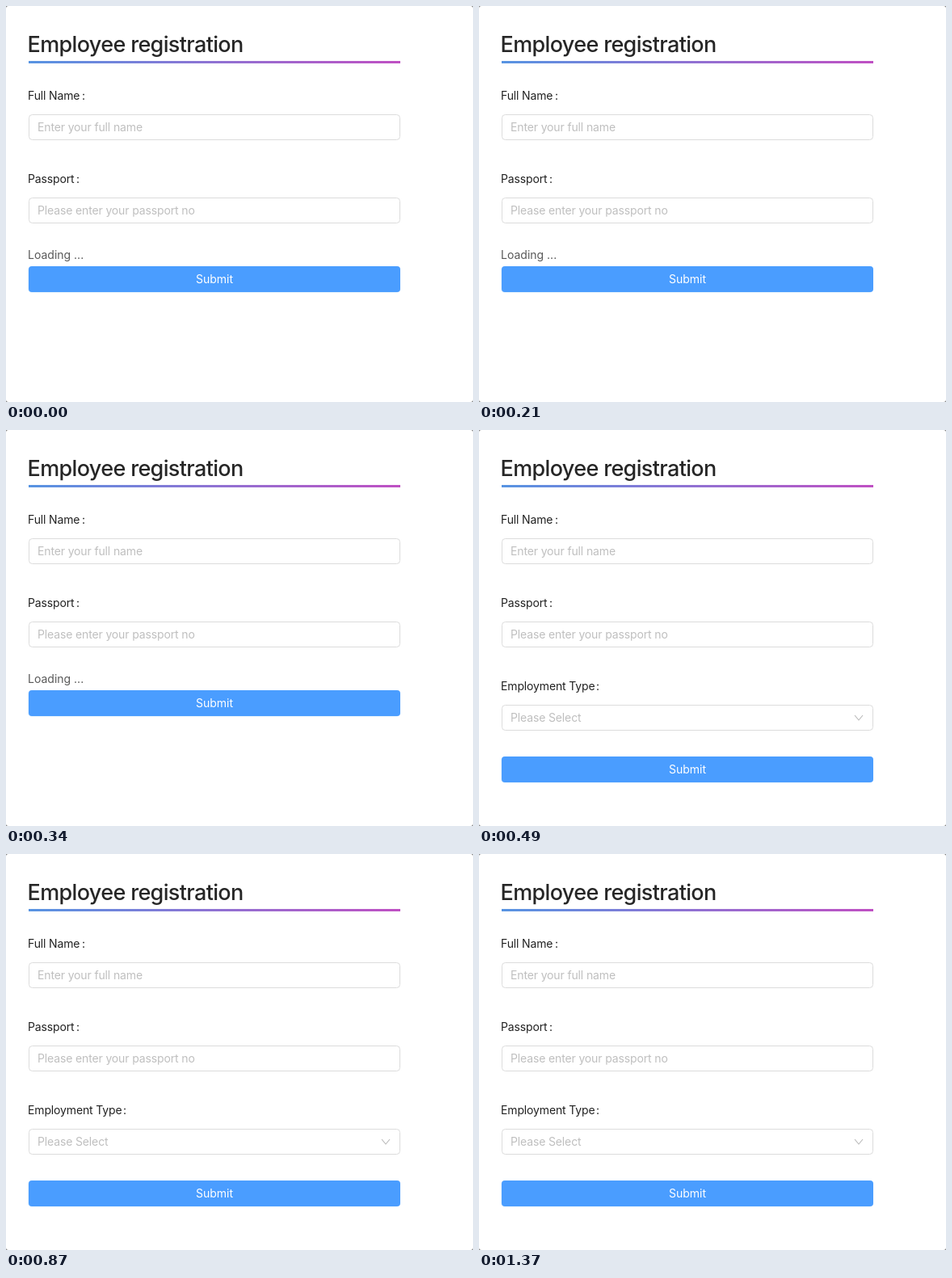
Animation of 578x490 px, one loop 1.54 s. Source, as an HTML page:

```html
<!DOCTYPE html>
<html lang="en">
<head>
<meta charset="utf-8">
<title>Employee registration</title>
<style>
  html, body { margin: 0; width: 100%; height: 100%; overflow: hidden; background: #fff; }
  svg { display: block; width: 578px; height: 490px; }
  text {
    font: 14px Inter, "Liberation Sans", sans-serif;
    font-optical-sizing: none;
    letter-spacing: -0.14px;
    fill: #222;
    white-space: pre;
  }
  .title { font-size: 27px; font-weight: 500; letter-spacing: -0.65px; fill: #262626; }
  .hint { fill: #bfbfbf; }
  .loading { fill: #595959; letter-spacing: 0; }
  .submit { fill: #fff; letter-spacing: 0; text-anchor: middle; }
  .box { fill: #fff; stroke: #dcdcdc; }
  .arrow { fill: none; stroke: #b8b8b8; stroke-width: 1.1; }
</style>
</head>
<body>
<svg viewBox="0 0 578 490">
  <defs>
    <linearGradient id="rule">
      <stop offset="0" stop-color="#5794e2"/>
      <stop offset="0.5" stop-color="#8f72d3"/>
      <stop offset="1" stop-color="#bf50c3"/>
    </linearGradient>
  </defs>
  <rect width="578" height="490" fill="#777"/>
  <rect width="578" height="490" rx="3" fill="#fff"/>

  <text class="title" x="26.5" y="57">Employee registration</text>
  <rect x="28" y="68" width="460" height="3" fill="url(#rule)"/>

  <g>
    <text x="27" y="116">Full Name</text><text x="94" y="116">:</text>
    <rect class="box" x="28.5" y="134.5" width="459" height="31" rx="4"/>
    <text class="hint" x="39" y="155">Enter your full name</text>
  </g>
  <g>
    <text x="27" y="219">Passport</text><text x="87" y="219">:</text>
    <rect class="box" x="28.5" y="237.5" width="459" height="31" rx="4"/>
    <text class="hint" x="39" y="258">Please enter your passport no</text>
  </g>

  <text id="loading" class="loading" x="27" y="313">Loading ...</text>
  <g id="extra" visibility="hidden">
    <text x="27" y="322">Employment Type</text><text x="145" y="322">:</text>
    <rect class="box" x="28.5" y="340.5" width="459" height="31" rx="4"/>
    <text class="hint" x="39" y="361">Please Select</text>
    <path class="arrow" d="M465 353L470 359L475 353"/>
  </g>

  <g id="button" transform="translate(0 322)">
    <rect x="27" y="0" width="461" height="33" rx="5" fill="#e9f5fd"/>
    <rect x="28" y="0" width="460" height="32" rx="4" fill="#4a9dff"/>
    <text class="submit" x="258" y="21">Submit</text>
  </g>
</svg>
<script>
  const LOOP = 1540, LOADED_AT = 490;
  const $ = id => document.getElementById(id);
  const show = (id, on) => $(id).setAttribute("visibility", on ? "visible" : "hidden");
  const start = performance.now();

  function draw() {
    const t = (performance.now() - start) % LOOP;
    const loaded = t >= LOADED_AT;
    show("loading", !loaded);
    show("extra", loaded);
    $("button").setAttribute("transform", `translate(0 ${loaded ? 404 : 322})`);
    requestAnimationFrame(draw);
  }
  draw();
</script>
</body>
</html>
```
